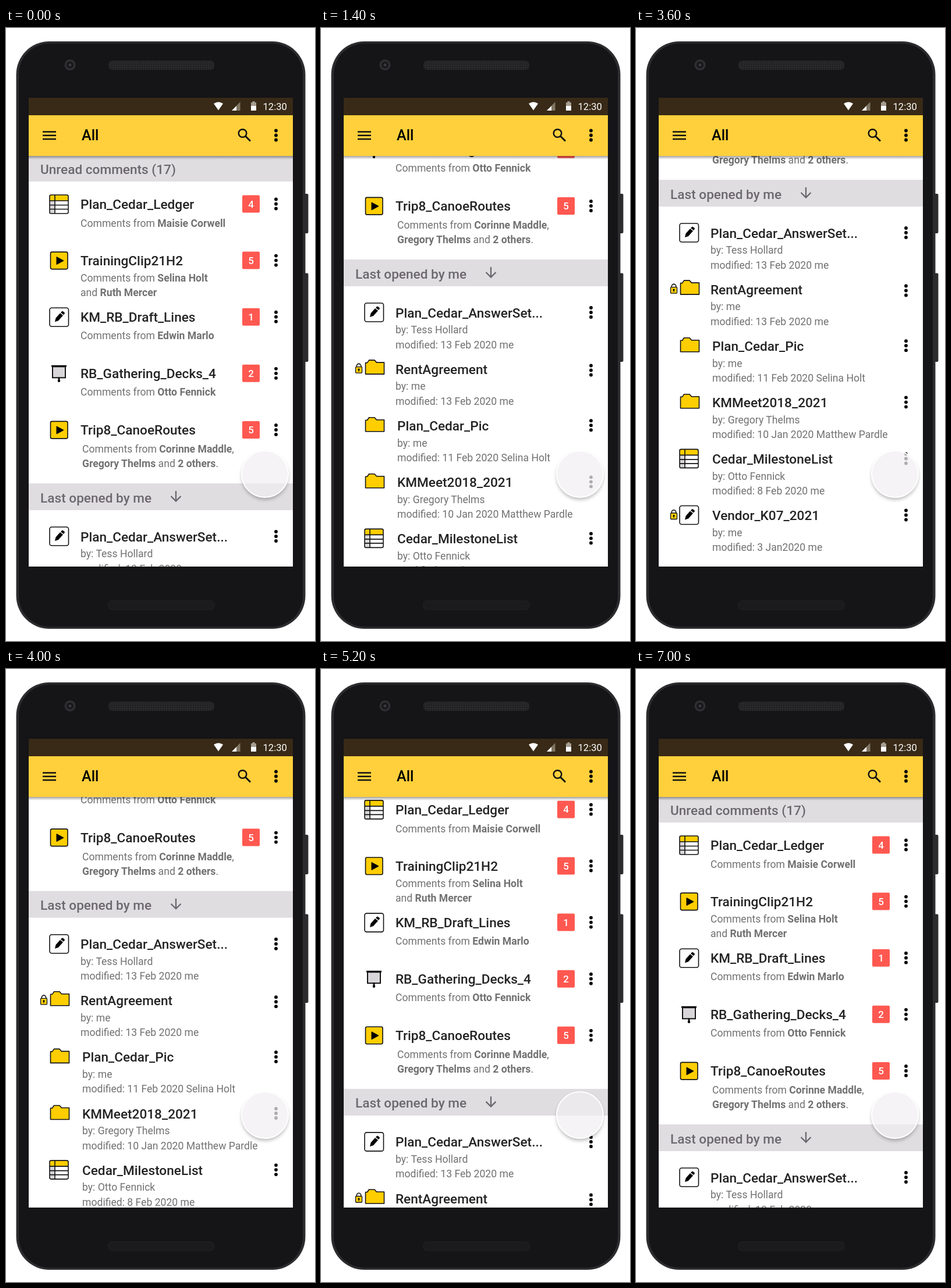
These frames come from a looping animation (531 by 1054 pixels, 7200 ms). An HTML page:

```html
<!DOCTYPE html>
<html lang="en">
<head>
<meta charset="utf-8">
<title>Scrolling file list</title>
<style>
  html, body { margin: 0; width: 100%; height: 100%; overflow: hidden; background: #fff; }
  svg { display: block; width: 100%; height: 100%; font-family: Roboto, sans-serif; }
  .title, .heading { font-size: 22.6px; font-weight: 500; fill: #232323; }
  .heading { fill: #6b686d; }
  .sub { font-size: 17.6px; fill: #717171; }
  .sub tspan { font-weight: 700; }
  .count { font-size: 17px; font-weight: 500; fill: #fff; text-anchor: middle; }
  .line { fill: none; stroke: #111; stroke-width: 1.6; }
</style>
</head>
<body>
<svg viewBox="0 0 531 1054" preserveAspectRatio="none">
  <defs>
    <clipPath id="screen"><rect x="39" y="120" width="454" height="806"/></clipPath>
    <linearGradient id="shade" x2="0" y2="1">
      <stop stop-opacity=".42"/><stop offset="1" stop-opacity="0"/>
    </linearGradient>
    <pattern id="mesh" width="4" height="4" patternUnits="userSpaceOnUse">
      <rect width="4" height="4" fill="#29282b"/><circle cx="2" cy="2" r="1.2" fill="#1c1b1e"/>
    </pattern>
    <filter id="soft" x="-30%" y="-30%" width="160%" height="160%"><feGaussianBlur stdDeviation="3"/></filter>

    <g id="dots"><circle cy="-8" r="2.9"/><circle r="2.9"/><circle cy="8" r="2.9"/></g>
    <g id="sheet">
      <rect x="-16" y="-16" width="32" height="32" rx="2.5" fill="#fff"/>
      <path d="M-16-6V-14q0-2 2-2H14q2 0 2 2V-6z" fill="#ffce00"/>
      <path d="M-16-6H-7V16H-14q-2 0-2-2z" fill="#d8d6d9"/>
      <path class="line" d="M-16-6H16M-16 1.5H16M-16 8.5H16M-7-16V16"/>
      <rect class="line" x="-16" y="-16" width="32" height="32" rx="2.5"/>
    </g>
    <g id="video">
      <rect class="line" x="-14.5" y="-15" width="29.5" height="29.5" rx="2.5" style="fill:#ffce00"/>
      <path d="M-4-6.5 8 0-4 6.5z" stroke="#000" stroke-linejoin="round"/>
    </g>
    <g id="note">
      <rect class="line" x="-16" y="-16" width="32.5" height="32" rx="3.5" style="fill:#fff"/>
      <path d="M-7 8-5.5 1.5 2-7 7-3-1 6zM3-8 5-10q1-1 2 0l2.500 2q1 1 0 2L8-4z"/>
    </g>
    <g id="slides">
      <rect class="line" x="-11" y="-12" width="22" height="19" style="fill:#d8d6d9;stroke-width:2"/>
      <path d="M-13-13H13M0 7V12" stroke="#111" stroke-width="3"/>
      <path d="M0 6V12" stroke="#111" stroke-width="2"/><circle cy="12.500" r="2.200"/>
    </g>
    <path id="folder" class="line" d="M-14.500 10.500V-9H-11.500L-8.500-13.500H1L4.500-9.500H17.500V10.500z" style="fill:#ffce00" stroke-linejoin="round"/>
    <g id="lock">
      <path class="line" d="M-3.700-4V-5.500a3.700 3.700 0 0 1 7.400 0V-4"/>
      <rect class="line" x="-5.500" y="-4" width="11" height="10.500" rx="1" style="fill:#ffce00;stroke-width:1.300"/>
      <circle cy=".5" r="1.600"/><path d="M-.7 0H.7V4H-.7z"/>
    </g>
  </defs>

  <!-- Phone body -->
  <g fill="#2c2b2e">
    <rect x="508" y="285" width="11.500" height="68" rx="2"/>
    <rect x="508" y="421.500" width="11.500" height="152.500" rx="2"/>
    <rect x="17.500" y="23" width="497" height="1010" rx="57"/>
  </g>
  <rect x="22" y="26.500" width="488" height="1003" rx="53" fill="#151417"/>
  <circle cx="110" cy="63.500" r="9.500" fill="#302f32"/>
  <circle cx="110" cy="63.500" r="6" fill="#19181b"/>
  <circle cx="110" cy="63.500" r="2.500" fill="#3a393d"/>
  <rect x="176" y="56" width="182" height="16" rx="7" fill="url(#mesh)"/>
  <rect x="176" y="985" width="182" height="15" rx="6" fill="#1b1a1d" stroke="#232225"/>

  <g clip-path="url(#screen)">
    <rect x="39" y="120" width="454" height="806" fill="#fff"/>
    <g id="list"></g>

    <!-- Floating button -->
    <circle cx="445" cy="771" r="40" fill="#000" opacity=".28" filter="url(#soft)"/>
    <circle id="button" cx="445" cy="767" r="40" fill="#fff"/>
    <g clip-path="url(#buttonClip)"><use href="#list"/></g>
    <circle cx="445" cy="767" r="40" fill="#f1eff2" fill-opacity=".72" stroke="#fff" stroke-width="2"/>

    <!-- App bar -->
    <rect x="39" y="219" width="454" height="7" fill="url(#shade)"/>
    <rect x="39" y="149" width="454" height="71" fill="#ffd03b"/>
    <rect x="39" y="120" width="454" height="30" fill="#382a17"/>
    <path d="M357 130q8-5.500 16 0L365 141.500z" fill="#fff"/>
    <path d="M388 142 402.500 127V142z" fill="#807664"/><path d="M388 142 396 134V142z" fill="#fff"/>
    <path d="M421 128H423.500V126H427.500V128H430V134H421z" fill="#a69d91"/>
    <path d="M421 134H430V142H421z" fill="#fff"/>
    <text x="441.500" y="141" font-size="16.600" fill="#fff">12:30</text>
    <path d="M63 178.500H86M63 184.700H86M63 191H86" stroke="#111" stroke-width="2.500"/>
    <text x="130" y="192.500" font-size="25" font-weight="500">All</text>
    <circle class="line" cx="406.500" cy="181" r="6.800" style="stroke-width:2.500"/>
    <path d="M411 185.500 420 194.500" stroke="#111" stroke-width="3"/>
    <use href="#dots" x="464" y="184.500"/>
  </g>
  <clipPath id="buttonClip"><circle cx="445" cy="767" r="40"/></clipPath>
</svg>

<script>
const list = document.getElementById('list');

const text = (cls, x, y, content) => `<text class="${cls}" x="${x}" y="${y}">${content}</text>`;
const icon = (name, x, y) => `<use href="#${name}" x="${x}" y="${y}"/>`;
const from = name => `Comments from <tspan>${name}</tspan>`;

const band = (top, bottom, baseline, label) =>
  `<rect x="39" y="${top}" width="454" height="${bottom - top}" fill="#e0dde1"/>` +
  text('heading', 59, baseline, label);

// Unread rows: icon, title, comment count, lines, first line offset, line indent
const unread = [
  ['sheet', 'Plan_Cedar_Ledger', 4, [from('Maisie Corwell')], 39, 128],
  ['video', 'TrainingClip21H2', 5, [from('Selina Holt'), 'and <tspan>Ruth Mercer</tspan>'], 36, 128],
  ['note', 'KM_RB_Draft_Lines', 1, [from('Edwin Marlo')], 37.5, 128],
  ['slides', 'RB_Gathering_Decks_4', 2, [from('Otto Fennick')], 37.5, 128],
  ['video', 'Trip8_CanoeRoutes', 5,
    [from('Corinne Maddle') + ',', '<tspan>Gregory Thelms</tspan> and <tspan>2 others</tspan>.'], 39, 131],
];

// Opened rows: icon, title, author, modified, locked, title x, line x
const opened = [
  ['note', 'Plan_Cedar_AnswerSet...', 'Tess Hollard', '13 Feb 2020 me', 0, 128, 128],
  ['folder', 'RentAgreement', 'me', '13 Feb 2020 me', 1, 128, 128],
  ['folder', 'Plan_Cedar_Pic', 'me', '11 Feb 2020 Selina Holt', 0, 131, 131],
  ['folder', 'KMMeet2018_2021', 'Gregory Thelms', '10 Jan 2020 Matthew Pardle', 0, 131, 131],
  ['sheet', 'Cedar_MilestoneList', 'Otto Fennick', '8 Feb 2020 me', 0, 131, 131],
  ['note', 'Vendor_K07_2021', 'me', '3 Jan2020 me', 1, 131, 131],
];

const unreadRow = ([kind, title, count, lines, offset, x], i) => {
  const y = 303 + 97.1 * i;
  return icon(kind, 91, y) + text('title', 128, y + 8, title) +
    `<rect x="406" y="${y - 15.5}" width="30" height="30" rx="2" fill="#ff5850"/>` +
    text('count', 421, y + 5.5, count) + icon('dots', 464, y - .5) +
    lines.map((line, n) => text('sub', x, y + offset + 25 * n, line)).join('');
};

const openedRow = ([kind, title, author, modified, locked, titleX, x], i) => {
  const y = 874.5 + 97.1 * i;
  const lift = locked && kind === 'folder' ? 1.5 : 0;
  return icon(kind, 91, y - .5 - lift) + (locked ? icon('lock', 65, y) : '') +
    text('title', titleX, y + 8, title) + icon('dots', 464, y - .5 + lift * 1.6) +
    text('sub', x, y + 35.8, 'by: ' + author) +
    text('sub', x, y + 61, 'modified: ' + modified);
};

list.innerHTML =
  band(200, 264, 250.5, 'Unread comments (17)') + unread.map(unreadRow).join('') +
  band(783, 829, 815.5, 'Last opened by me') +
  '<path d="M292 796V813.500M283.500 805 292 813.500 300.500 805" fill="none" stroke="#6b686d" stroke-width="2.300"/>' +
  opened.map(openedRow).join('');

// Scroll keys: time in ms, offset in px, velocity in px/ms
const keys = [
  [0, 0, 0], [600, 147.5, .41], [1400, 385, 0], [1900, 385, 0], [2400, 524, 0],
  [3550, 524, 0], [4400, 232.5, -.32], [5600, 15.5, -.1], [5800, 0, 0], [7200, 0, 0],
];
const LOOP = 7200, STEP = 200;

function scrollAt(time) {
  const next = keys.findIndex(key => key[0] > time);
  const [t0, p0, v0] = keys[next - 1], [t1, p1, v1] = keys[next];
  const span = t1 - t0, u = (time - t0) / span, w = 1 - u;
  return p0 * w * w * (1 + 2 * u) + p1 * u * u * (3 - 2 * u) + span * u * w * (v0 * w - v1 * u);
}

const start = performance.now();
function draw() {
  const time = (performance.now() - start) % LOOP;
  const offset = scrollAt(Math.floor(time / STEP) * STEP);
  list.setAttribute('transform', `translate(0 ${-offset})`);
  requestAnimationFrame(draw);
}
draw();
</script>
</body>
</html>
```
